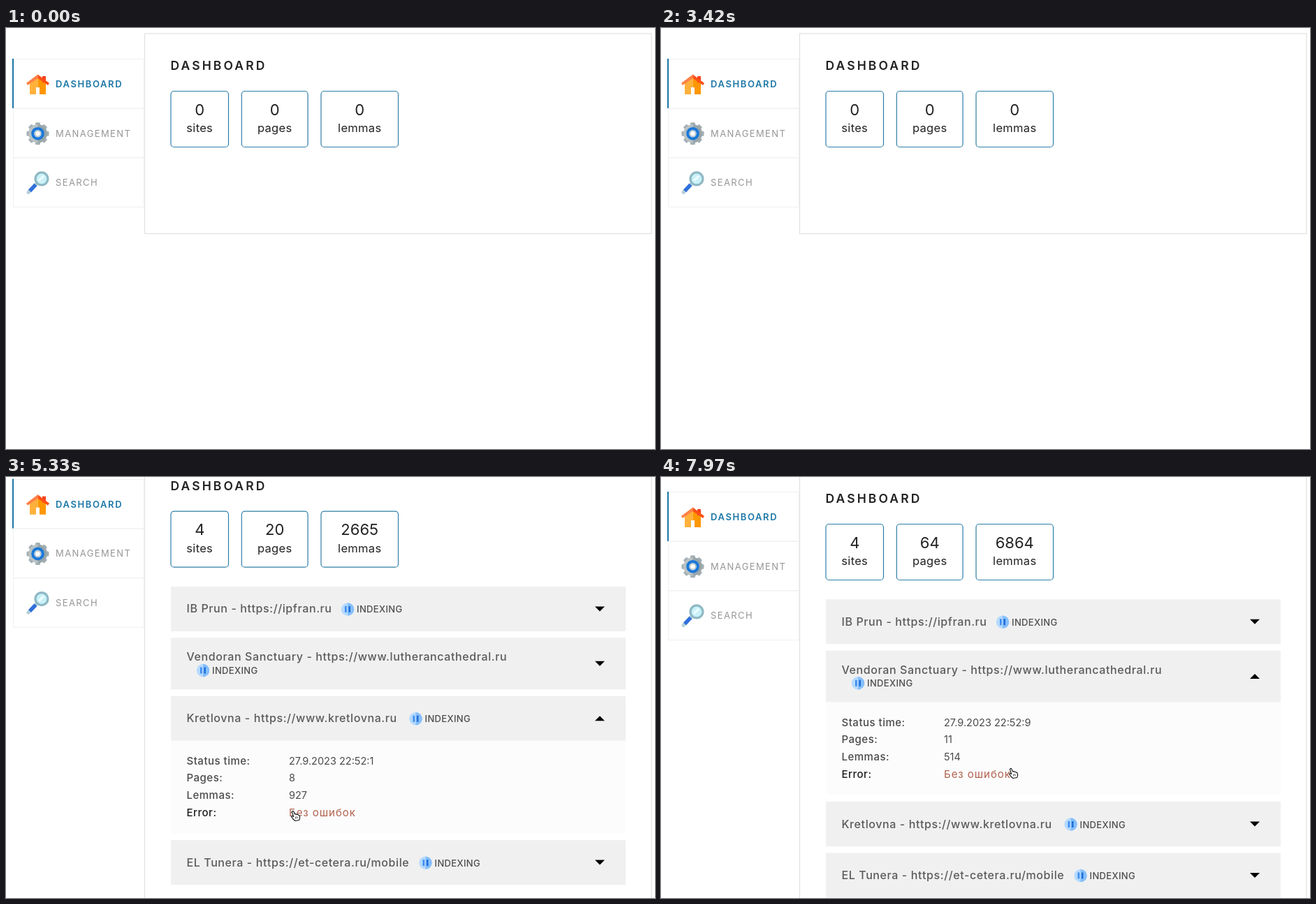
An HTML page for the animation above (8 s loop, 929 px wide and 603 px high).

```html
<!DOCTYPE html>
<html lang="en">
<head>
<meta charset="utf-8">
<title>Indexing dashboard</title>
<style>
  html, body { margin: 0; width: 100%; height: 100%; overflow: hidden; background: #fff; }
  svg { display: block; width: 929px; height: 603px; font-family: Inter, "Open Sans", sans-serif; }
  text { white-space: pre; }
  .heading { font-size: 17.5px; font-weight: 600; letter-spacing: 3.1px; fill: #222; }
  .tab { font-size: 13px; letter-spacing: 1.4px; fill: #969696; }
  .tab.on { font-weight: 600; letter-spacing: 1.6px; fill: #1a76a6; }
  .count { font-size: 22px; text-anchor: middle; fill: #222; }
  .unit { font-size: 16.5px; letter-spacing: .3px; text-anchor: middle; fill: #222; }
  .button { font-size: 12.5px; font-weight: 500; letter-spacing: .75px; text-anchor: middle; fill: #fff; }
  .site { font-size: 16px; font-weight: 500; letter-spacing: .6px; fill: #5a5a5a; }
  .status { font-size: 13px; font-weight: 500; letter-spacing: .35px; fill: #4d4d4d; }
  .label { font-size: 15px; font-weight: 500; letter-spacing: .5px; fill: #4a4a4a; }
  .label.dark { fill: #1c1c1c; }
  .value { font-size: 14.5px; fill: #4a4a4a; }
  .error { font-size: 15px; letter-spacing: .95px; fill: #b1614d; }
</style>
</head>
<body>
<svg id="stage" viewBox="0 0 929 603"></svg>
<script>
const LOOP = 8000, SLIDE = 200, TURN = 150;
const MANAGE = 1000, START = 1560, DASH = 2390, LOAD = 3450, RELOAD = 6950;
const ROW = 64, TALL_ROW = 74, GAP = 9.4, DETAILS = 133, LINE = 24.75;

// Details hold finishing time, pages and lemmas, before and after the reload.
const sites = [
  { title: 'IB Prun - https://ipfran.ru', badge: 489, first: '22:51:59 2 589', second: '22:52:8 8 1520' },
  { title: 'Vendoran Sanctuary - https://www.lutherancathedral.ru', badge: 282, tall: true, first: '22:52:0 4 470', second: '22:52:9 11 514' },
  { title: 'Kretlovna - https://www.kretlovna.ru', badge: 586.5, first: '22:52:1 8 927' },
  { title: 'EL Tunera - https://et-cetera.ru/mobile', badge: 600.5, first: '22:52:0 6 679' }
];

// Opening a row closes the one before it; a reload closes all.
const clicks = [3780, 4640, 5060, 5650, 7200, 7410].map((time, i) => ({ time, row: i % sites.length }));

// The pointer rests at a stop, then moves on in the last part of the wait.
const TRAVEL = .4;
const stop = (time, x, y, shape = 'arrow') => ({ time, x, y, shape });
const stops = [
  stop(110, 545, 485), stop(190, 388, 216), stop(480, 440, -18),
  stop(780, 45, 146, 'hand'), stop(1330, 320, 103, 'hand'), stop(2220, 154, 87, 'hand'),
  stop(2860, 302, 142), stop(3220, 685, -18), stop(3730, 430, 222, 'hand'),
  stop(4190, 426, 324), stop(4500, 484, 434, 'hand'), stop(5020, 408, 478, 'hand'),
  stop(5630, 570, 545, 'hand'), stop(6030, 586, 359, 'hand'), stop(RELOAD, 640, -18),
  stop(7180, 592, 217, 'hand'), stop(7405, 506, 415, 'hand'), stop(7690, 498, 417, 'hand')
];

const clamp = v => Math.max(0, Math.min(1, v));
const swing = v => .5 - Math.cos(clamp(v) * Math.PI) / 2;
const mix = (a, b, u) => a + (b - a) * u;

function scrollTop(t) {
  const down = swing((t - 4860) / 140), up = swing((t - 6170) / 110);
  const bounce = Math.sin(Math.PI * clamp((t - 6220) / 200));
  return 41.3 * (down - up) - 2.8 * bounce + 23 * swing((t - 7830) / 140);
}

const text = (cls, x, y, s) => `<text class="${cls}" x="${x}" y="${y}">${s}</text>`;
const rect = (x, y, w, h, attrs) => `<rect x="${x}" y="${y}" width="${w}" height="${h}" ${attrs}/>`;
const path = (d, attrs) => `<path d="${d}" ${attrs}/>`;
const circle = (x, y, r, attrs) => `<circle cx="${x}" cy="${y}" r="${r}" ${attrs}/>`;
const move = (x, y, body) => `<g transform="translate(${x} ${y})">${body}</g>`;

// Icons are drawn around their own centre.
const house =
  path('M-11.5-1L0-10V14.5h-11.5z', 'fill="#ffb13b"') + path('M11.5-1L0-10V14.5h11.5z', 'fill="#ff9700"') +
  rect(-2.5, 4.5, 5, 10.5, 'fill="#fff"') + rect(6.5, -11.5, 5, 9, 'fill="#f5431c"') +
  path('M0-14L-16.5-1.5l2 3L0-8.5z', 'fill="#ff8046"') + path('M0-14L16.5-1.5l-2 3L0-8.5z', 'fill="#ff4f18"');

const teeth = [0, 45, 90, 135].map(a => rect(-3.5, -16, 7, 32, `rx="1.5" transform="rotate(${a})"`)).join('');
const gear = `<g fill="#a4afb3">${teeth}</g>` + circle(0, 0, 13.3, 'fill="#b9c2c4"') +
  path('M0-13.3a13.3 13.3 0 0 1 0 26.6z', 'fill="#98a5aa"') +
  circle(0, 0, 7.3, 'fill="#cfeaff" stroke="#1b78d8" stroke-width="4"') +
  circle(0, 0, 4, 'fill="#fff" stroke="#b9c2c4" stroke-width="1.5"');

const lens = path('M-1.5 1L-13.5 13.5', 'stroke="#b4cfd8" stroke-width="5" stroke-linecap="round"') +
  path('M-3 2.5l-8.5 9', 'stroke="#2f70dc" stroke-width="5.5"') +
  circle(5.5, -6, 9, 'fill="#c9f1f8" stroke="#8fb8c4" stroke-width="3.2"') +
  path('M1.5-3l7-7', 'stroke="#effcff" stroke-width="3"');

const tabs = [['DASHBOARD', house], ['MANAGEMENT', gear], ['SEARCH', lens]];

const badge = circle(0, 0, 9.2, 'fill="#b5daff"') + path('M0-9.2a9.2 9.2 0 0 1 0 18.4z', 'fill="#86bffa"') +
  rect(-4, -4.5, 2.6, 9, 'fill="#3f8df0"') + rect(1.4, -4.5, 2.6, 9, 'fill="#1f6fd8"') + text('status', 13, 5, 'INDEXING');

const pointers = {
  arrow: path('M0 0V12.5L3 9.8 5 14.3 7 13.4 5 9H9z', 'fill="#111" stroke="#fff" stroke-width=".8"'),
  hand: path('M1.5 2q0-2 2-1.5l2 4.5q2-1 2.5.5q2-.6 2.5.6q1.5 0 1.7 1.2q1 4-.6 6.2l-5.8 1q-4-3-5.2-6q0-2 3 0z',
    'fill="#fff" stroke="#111" stroke-width="1.1" stroke-linejoin="round"') +
    path('M6.2 8.5l.6 3m1.6-3.3l.6 3', 'stroke="#111" stroke-width=".8"')
};

function pointer(t) {
  const i = stops.findLastIndex(s => s.time <= t);
  if (i < 0) return '';
  const from = stops[i], to = stops[i + 1] || from;
  const wait = to.time - from.time || 1;
  const u = swing(1 - (to.time - t) / (wait * TRAVEL));
  return move(mix(from.x, to.x, u), mix(from.y, to.y, u), pointers[from.shape]);
}

function sidebar(active, right) {
  const pitch = 70.7;
  return tabs.map(([name, icon], i) => {
    const y = 44.5 + i * pitch, on = i === active;
    return rect(10.5, y, right - 12, pitch, 'fill="none" stroke="#f0f0f0"') +
      (on ? rect(9, y - .5, 2, 71, 'fill="#1a76a6"') : '') +
      text(on ? 'tab on' : 'tab', 71, y + 40.5, name) + move(45.5, y + 36, icon);
  }).join('');
}

const card = (x, w, count, unit) =>
  rect(x, 90.5, w, 80, 'rx="4.5" fill="#fff" stroke="#2f7fa8" stroke-width="1.2"') +
  text('count', x + w / 2, 124.5, count) + text('unit', x + w / 2, 149.3, unit);

function management(t) {
  const started = t >= START, w = started ? 183.5 : 193;
  return text('heading', 236.5, 60, 'MANAGEMENT') + rect(237, 90, w, 38.5, 'rx="4.5" fill="#16a2f8"') +
    text('button', 237 + w / 2, 113.5, started ? 'STOP INDEXING' : 'START INDEXING') +
    (started ? '' : rect(237.5, 182.5, 649, 39, 'rx="4.5" fill="none" stroke="#dedede"'));
}

function openness(row, t) {
  const since = t >= RELOAD ? RELOAD : 0;
  const i = clicks.findLastIndex(c => c.row === row && c.time <= t && c.time >= since);
  if (i < 0) return { slide: 0, turn: 0 };
  const opened = t - clicks[i].time, closed = t - (clicks[i + 1]?.time ?? LOOP);
  return {
    slide: swing(opened / SLIDE) - swing(closed / SLIDE),
    turn: clamp(opened / TURN) - clamp(closed / TURN)
  };
}

function details(data, top, slide, id) {
  const [time, pages, lemmas] = data.split(' ');
  const height = DETAILS * slide, base = top + 34 - 38 * (1 - slide);
  const line = (i, label, value, dark = '', cls = 'value') =>
    text('label ' + dark, 258.5, base + i * LINE, label) + text(cls, 405, base + i * LINE, value);
  return `<clipPath id="${id}">${rect(236, top, 651, height, '')}</clipPath><g clip-path="url(#${id})">` +
    rect(236, top, 651, height, 'fill="#fcfcfc"') +
    line(0, 'Status time:', '27.9.2023 ' + time) + line(1, 'Pages:', pages) +
    line(2, 'Lemmas:', lemmas) + line(3, 'Error:', 'Без ошибок', 'dark', 'error') + '</g>';
}

function accordion(t) {
  let y = 198.2, out = '';
  sites.forEach((site, i) => {
    const { slide, turn } = openness(i, t);
    const h = site.tall ? TALL_ROW : ROW, bottom = y + h;
    const data = t >= RELOAD && site.second || site.first;
    out += rect(236, y, 651, h, 'fill="#f0f0f0"') +
      text('site', 258.5, y + (site.tall ? 33 : 37.5), site.title) +
      move(site.badge, y + (site.tall ? 46.7 : 32.5), badge) +
      move(850, y + h / 2, path('M-7-3.5H7L0 3.5z', `transform="rotate(${turn * 180})"`));
    if (slide > 0) out += details(data, bottom, slide, 'clip' + i);
    y = bottom + GAP + DETAILS * slide;
  });
  return { out, end: y + 28 };
}

function dashboard(t, list) {
  const [count, pages, lemmas] = t >= RELOAD ? [4, 64, 6864] : t >= LOAD ? [4, 20, 2665] : [0, 0, 0];
  return text('heading', 235.5, 60, 'DASHBOARD') + card(236, 82.5, count, 'sites') +
    card(337.3, 94.8, pages, 'pages') + card(451, 110.5, lemmas, 'lemmas') + list;
}

function scene(t) {
  const managing = t >= MANAGE && t < DASH, left = managing ? 200 : 198.5;
  const list = t >= LOAD ? accordion(t) : { out: '', end: 294.5 };
  const page = rect(left, 8, 924 - left, list.end - 8, 'fill="#fff" stroke="#dfe1e2" stroke-width="1.2"') +
    sidebar(managing ? 1 : 0, left) + (managing ? management(t) : dashboard(t, list.out));
  return move(0, -scrollTop(t), page) + pointer(t);
}

const stage = document.getElementById('stage');
let shown = '';
function draw() {
  const next = scene(performance.now() % LOOP);
  if (next !== shown) stage.innerHTML = shown = next;
  requestAnimationFrame(draw);
}
draw();
</script>
</body>
</html>
```
